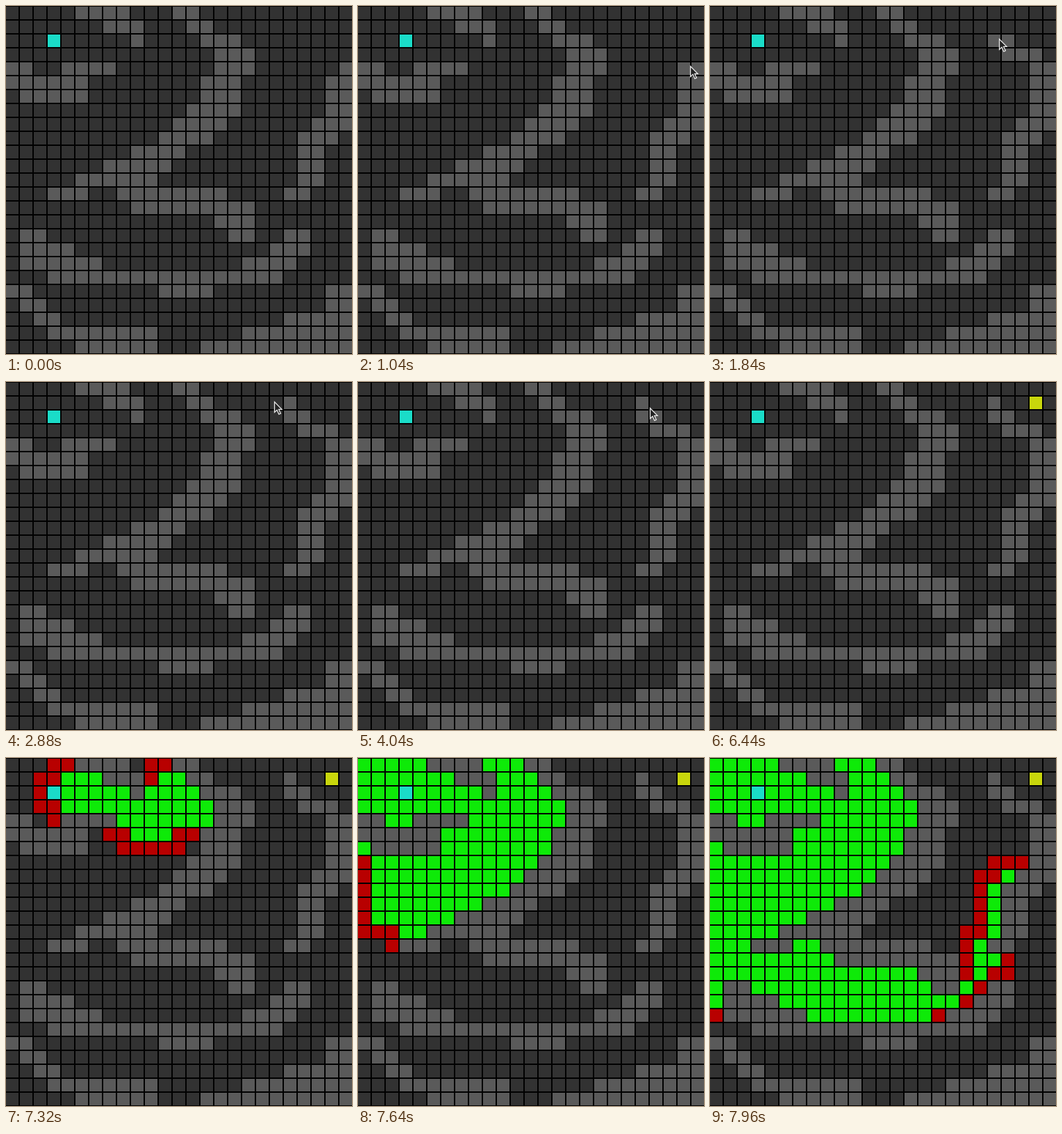
An HTML page with a canvas for the animation above (8000 ms loop, 498 by 500 pixels).

```html
<!DOCTYPE html>
<html lang="en">
<head>
<meta charset="utf-8">
<title>Path search</title>
<style>
html, body { margin: 0; width: 100%; height: 100%; overflow: hidden; background: #000; }
canvas { display: block; }
</style>
</head>
<body>
<canvas id="stage" width="498" height="500"></canvas>
<script>
const ctx = document.getElementById('stage').getContext('2d');
const N = 25, LOOP = 8000, STEP = 40;
const SEARCH = 7200;
const START = { x: 3, y: 2 }, END = { x: 23, y: 1 };
const COLORS = {
  open: '#323232', wall: '#5a5a5a', visited: '#0eea08',
  frontier: '#b80000', start: '#1adcc8', end: '#c8d60c'
};

// Wall columns of each row, as spans.
const ROWS = `5-8 12-13
7-9 13-14
9 14-16
15-17
0-1 4-7 15-17 24
0-5 14-16 23-24
1-5 14-16 23-24
13-16 23-24
12-15 22-24
11-14 21-23
9-12 21-22
7-11 21-22
5-10 21-22
3-5 8-15 20-21
9-17
15-17
1-2 16-17 20-21
1-4 19-21
1-6 17-20
3-19
0-1 11-14 23-24
1-2 23-24
2-3 20-24
3-10 17-24
5-10 14-24`.split('\n');

// Walls painted with the pointer: time, column, row.
const PAINTED = [
  [920, 23, 4], [1440, 23, 3], [1560, 22, 3], [1680, 21, 3],
  [1760, 21, 2], [1840, 20, 2], [1920, 20, 1]
];

// Pointer tip: time, x, y.
const POINTER = [
  [600, 494, 106], [800, 484, 96], [1040, 478, 86], [1320, 478, 85],
  [1460, 472, 72], [1700, 430, 66], [1940, 408, 36], [2160, 387, 29],
  [2880, 386, 28], [3320, 362, 25], [3600, 362, 25], [4400, 463, 46],
  [4640, 446, 44], [4960, 482, 25], [5280, 481, 25], [5520, 470, 30],
  [5720, 474, 50], [6040, 499, 130]
];

const id = (x, y) => y * N + x;
const walls = new Set();
ROWS.forEach((row, y) => row.split(' ').forEach(span => {
  const [a, b = a] = span.split('-').map(Number);
  for (let x = a; x <= b; x++) walls.add(id(x, y));
}));

// A* over eight neighbours with unit steps; returns the order of visits.
function search() {
  const blocked = new Set(walls);
  PAINTED.forEach(([, x, y]) => blocked.add(id(x, y)));
  const dist = (x, y) => Math.hypot(END.x - x, END.y - y);
  const open = [{ ...START, g: 0, f: dist(START.x, START.y) }];
  const closed = new Set(), order = [];
  while (open.length) {
    let best = 0;
    open.forEach((n, i) => { if (n.f < open[best].f) best = i; });
    const cur = open.splice(best, 1)[0];
    closed.add(id(cur.x, cur.y));
    order.push(cur);
    if (cur.x === 21 && cur.y === 8) break;
    for (const { x, y } of around(cur)) {
      const key = id(x, y), g = cur.g + 1;
      if (blocked.has(key) || closed.has(key)) continue;
      const f = g + dist(x, y);
      const seen = open.find(n => n.x === x && n.y === y);
      if (!seen) open.push({ x, y, g, f });
      else if (g < seen.g) Object.assign(seen, { g, f });
    }
  }
  return order;
}

function around({ x, y }) {
  const list = [];
  for (let dx = -1; dx <= 1; dx++) {
    for (let dy = -1; dy <= 1; dy++) {
      const nx = x + dx, ny = y + dy;
      if ((dx || dy) && nx >= 0 && ny >= 0 && nx < N && ny < N) list.push({ x: nx, y: ny });
    }
  }
  return list;
}

const order = search();

function visitedCount(t) {
  const k = Math.floor((t - SEARCH) / STEP);
  if (k < 0) return 0;
  if (k <= 3) return 9 * (k + 1);
  return Math.round(36 + (order.length - 36) * (k - 3) / 16);
}

function cell(x, y, color) {
  ctx.fillStyle = color;
  ctx.fillRect(x * 20, y * 20 + 1, 18, 18);
}

function drawPointer(t) {
  const i = POINTER.findIndex(p => p[0] > t);
  if (i < 1) return;
  const [t0, x0, y0] = POINTER[i - 1], [t1, x1, y1] = POINTER[i];
  const p = (t - t0) / (t1 - t0), e = p * p * (3 - 2 * p);
  ctx.save();
  ctx.translate(Math.round(x0 + (x1 - x0) * e), Math.round(y0 + (y1 - y0) * e));
  ctx.fillStyle = '#222';
  ctx.strokeStyle = '#e8e8e8';
  ctx.lineWidth = 1.3;
  const arrow = new Path2D('M.5 .5V15.5L4 12.3L6.8 18.3L9.3 17.2L6.6 11.3H11Z');
  ctx.fill(arrow);
  ctx.stroke(arrow);
  ctx.restore();
}

function draw(t) {
  const blocked = new Set(walls);
  for (const [at, x, y] of PAINTED) if (t >= at) blocked.add(id(x, y));
  ctx.fillStyle = '#000';
  ctx.fillRect(0, 0, 498, 500);
  for (let y = 0; y < N; y++) {
    for (let x = 0; x < N; x++) cell(x, y, blocked.has(id(x, y)) ? COLORS.wall : COLORS.open);
  }

  const visited = order.slice(0, visitedCount(t));
  for (const n of visited) {
    for (const { x, y } of around(n)) if (!blocked.has(id(x, y))) cell(x, y, COLORS.frontier);
  }
  for (const n of visited) cell(n.x, n.y, COLORS.visited);

  cell(START.x, START.y, COLORS.start);
  if (t >= 4880) cell(t < 5400 ? 24 : END.x, END.y, COLORS.end);
  drawPointer(t);
}

const begin = performance.now();
function tick() {
  const t = (performance.now() - begin) % LOOP;
  draw(Math.floor(t / STEP) * STEP);
  requestAnimationFrame(tick);
}
tick();
</script>
</body>
</html>
```
